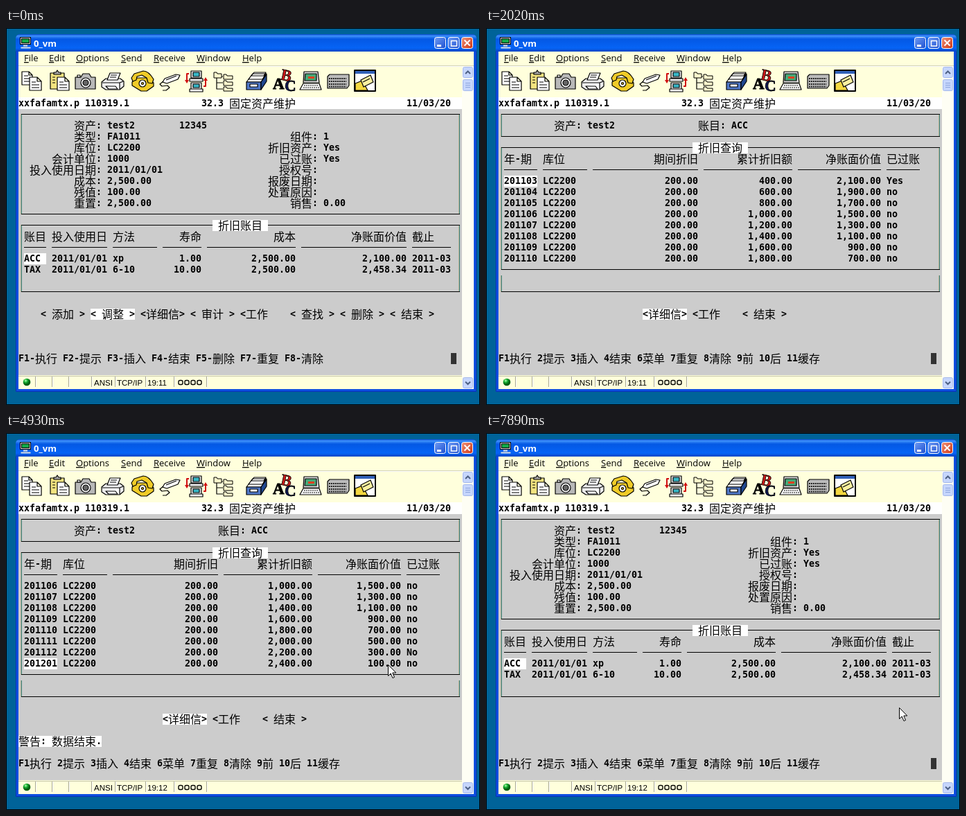
Recreate the animation shown at these times as an HTML page. Size 684 by 544 pixels, loop 8000 ms.

```html
<!DOCTYPE html>
<html lang="zh">
<head>
<meta charset="utf-8">
<title>Terminal</title>
<style>
html, body { margin: 0; width: 100%; height: 100%; overflow: hidden; background: #006399; }
svg { display: block; }
text { white-space: pre; }
.a { font: bold 13.29px "DejaVu Sans Mono", monospace; }
.c { font: 16px "Noto Sans CJK SC", "Noto Sans CJK", sans-serif; }
.menu { font: 13px "Open Sans", sans-serif; }
.bar { font: 11.5px "Liberation Sans", sans-serif; }
.abc { font: bold 23px "Liberation Serif", serif; stroke-width: .8; }
.icons { fill: #fff; stroke: #000; stroke-width: 1.2; stroke-linejoin: round; }
.n { fill: none; }
</style>
</head>
<body>
<svg width="684" height="544" viewBox="0 0 684 544">
<defs>
  <linearGradient id="cap" x2="0" y2="1">
    <stop offset="0" stop-color="#0a4ad0"/><stop offset=".1" stop-color="#3d90fa"/>
    <stop offset=".28" stop-color="#0458e4"/><stop offset=".8" stop-color="#0664f6"/>
    <stop offset="1" stop-color="#0344c4"/>
  </linearGradient>
  <linearGradient id="btn" x2="1" y2="1">
    <stop offset="0" stop-color="#6f9cf5"/><stop offset="1" stop-color="#1c4fd0"/>
  </linearGradient>
  <linearGradient id="red" x2="1" y2="1">
    <stop offset="0" stop-color="#f0937a"/><stop offset="1" stop-color="#cc3311"/>
  </linearGradient>
  <radialGradient id="led" cx=".35" cy=".3">
    <stop offset="0" stop-color="#b0ffb0"/><stop offset=".5" stop-color="#18b030"/><stop offset="1" stop-color="#006010"/>
  </radialGradient>
</defs>
<rect width="684" height="544" fill="#006399"/>
<path d="M.5 .5H683.5V543.5H.5Z" fill="none" stroke="#000"/>

<!-- window frame -->
<path d="M14 525V16q0-7 7-7H672q7 0 7 7V525Z" fill="#0f4fe0"/>
<path d="M14 34V16q0-7 7-7H672q7 0 7 7V34Z" fill="url(#cap)"/>
<path d="M14.5 34V524.5H678.5V34" fill="none" stroke="#0830b8"/>
<rect x="18" y="34" width="657" height="487" fill="#ffffdc"/>
<path d="M18 54.5H675" stroke="#d0d0b4"/>
<path d="M18 55.5H675" stroke="#fff"/>
<g stroke="#000">
  <rect x="20.5" y="13.5" width="15" height="10" fill="#d8d8d8"/>
  <rect x="22.5" y="15.5" width="11" height="6" fill="#12a848"/>
  <path d="M25 25.5h6M21.5 28.5h14" stroke="#ddd" stroke-width="2"/>
</g>
<text x="40" y="26.5" fill="#fff" style="font:bold 13px 'Open Sans',sans-serif">0_vm</text>
<g stroke="#fff">
  <rect x="618.5" y="13.5" width="16" height="16" rx="3" fill="url(#btn)"/>
  <rect x="638" y="13.5" width="16" height="16" rx="3" fill="url(#btn)"/>
  <rect x="657.5" y="13.5" width="16" height="16" rx="3" fill="url(#red)"/>
  <path d="M622 25.5h6" stroke-width="3"/>
  <path d="M642 18.5h8.5M642.5 18v8h8v-8" class="n" stroke-width="1.5"/>
  <path d="M661.5 17.5l8 8m0-8l-8 8" stroke-width="2"/>
</g>
<g id="menu" class="menu"></g>

<!-- toolbar -->
<g class="icons">
  <path d="M23 63h10l5 5v14H23ZM33 63v5h5M26 69h6M26 73h9M26 77h9"/>
  <path d="M34 71h11l6 6v13H34ZM45 71v6h6M37 78h6M37 82h11M37 86h11"/>

  <path d="M64 65h20v23H64Z" fill="#f2e480"/>
  <path d="M69 67v-3h3l2-3 2 3h3v3Z" fill="#aaa"/>
  <path d="M74 71h11l6 6v13H74ZM85 71v6h6M77 78h6M77 82h11M77 86h11M67 71h4M67 75h4M67 79h4"/>

  <path d="M100 71h8l3-5h9l3 5h6v17h-29Z" fill="#b8b8b8"/>
  <path d="M103 68h4v3h-4Z"/>
  <circle cx="115" cy="79" r="7"/><circle cx="115" cy="79" r="4" fill="#666"/>

  <path d="M138 78l6-5h21l5 4v7l-6 5h-20l-6-4Z" fill="#eee"/>
  <path d="M146 75l4-10h15l-4 10ZM151 68h9M150 71h9M139 79h25v9M164 79l5-2"/>
  <path d="M144 84h14l3 4h-13Z"/>

  <g fill="#f0cc28">
    <path d="M182 78l7-6h14l10 7v5l-10 7h-8l-13-8Z"/>
    <path d="M181 72l4-6 13-4q8 0 15 12l-2 6-6-1-2-7-7-4-7 2-1 5-5 2Z"/>
    <circle cx="197" cy="80" r="5" fill="#fff"/><circle cx="197" cy="80" r="1.5"/>
  </g>

  <path d="M229 73l16-6 6 1-3 6-16 6-6-2Z"/>
  <path d="M231 75l15-6M227 77l-5 4 3 3 8-1 3 3-5 4h-5" class="n"/>

  <g fill="#eee">
    <path d="M267 62h15v10h-15ZM265 73h19v4h-19ZM267 79h15v9h-15ZM265 88h19v4h-19Z"/>
    <path d="M270 64h9v6h-9ZM270 81h9v5h-9Z" fill="#38b8c8"/>
  </g>
  <path d="M264 66h-3v10M285 84h3v-9" stroke="#d01010" stroke-width="2" class="n"/>
  <path d="M258 75h6l-3 5ZM285 76h6l-3-5Z" fill="#d01010" stroke="none"/>

  <path d="M304 72v16h9M304 79h9M304 70h9" class="n"/>
  <path d="M300 64h4l1 2h6v6h-11ZM314 67h4l1 2h8v5h-13ZM314 76h4l1 2h8v5h-13ZM314 85h4l1 2h8v4h-13Z" fill="#fbf6cc" stroke-width="1"/>

  <path d="M347 78l9-12h20l-8 12Z"/>
  <path d="M350 74l6-8h19l-5 8ZM354 69l4-5h17l-3 5Z"/>
  <path d="M347 78h21v11h-21Z" fill="#5078c8"/><path d="M368 78l8-11v10l-8 12Z" fill="#204890"/>
  <path d="M352 81h11v4h-11Z"/>

  <text class="abc" x="385" y="88" fill="#000">A</text>
  <text class="abc" x="397" y="76" fill="#d01818" transform="rotate(12 404 68)">B</text>
  <text class="abc" x="402" y="91" fill="#101850">C</text>

  <path d="M430 63h20l2 16h-23Z" fill="#ddd"/><path d="M432 66h16v10h-17Z" fill="#48a878"/>
  <path d="M436 70h9v3h-9Z" fill="#e04020" stroke="none"/>
  <path d="M429 80h23l3 9h-31Z"/><path d="M430 83h21M429 86h23" stroke-dasharray="2 1"/>

  <path d="M464 70l3-3h28v16l-3 4h-28Z" fill="#bbb"/>
  <path d="M466 73h25M466 77h25M466 81h25M466 84.5h25" stroke="#222" stroke-width="2" stroke-dasharray="2 1"/>

  <path d="M503 61h30v30h-30Z" stroke-width="2"/>
  <path d="M504 62h28v4h-28Z" fill="#3060b8" stroke="none"/>
  <path d="M504 80l10-4 8 14h-18Z" fill="#f4d840"/>
  <path d="M512 75l14-7 4 10-14 7Z" fill="#fbf0a0"/><path d="M515 78l10-5" class="n"/>
</g>

<!-- scrollbar -->
<rect x="658" y="56" width="17" height="465" fill="#fefef4"/>
<g fill="#c6d6fc" stroke="#a4b8ea">
  <rect x="659.5" y="56.5" width="14" height="15" rx="2"/>
  <rect x="659.5" y="74.5" width="14" height="16" rx="2"/>
  <rect x="659.5" y="504.5" width="14" height="15" rx="2"/>
</g>
<path d="M663 66l3.5-3.5 3.5 3.5M663 510.5l3.5 3.5 3.5-3.5" fill="none" stroke="#4d6185" stroke-width="2"/>
<path d="M663 79.5h7M663 82.5h7M663 85.5h7" stroke="#8ca4dc"/>

<!-- terminal -->
<rect x="18" y="100" width="640" height="17" fill="#fff"/>
<rect x="18" y="117" width="640" height="384" fill="#ccc"/>
<g id="term"></g>

<!-- status bar -->
<path d="M18 502.5H658" stroke="#c8c8ac"/>
<g id="seps"></g>
<circle cx="30" cy="511" r="5.3" fill="url(#led)"/>
<g class="bar">
  <text x="127" y="515.5">ANSI</text><text x="160" y="515.5">TCP/IP</text>
  <text id="clock" x="204" y="515.5"></text>
</g>
<g id="dots" fill="none" stroke="#000" stroke-width="1.4"></g>

<path id="mouse" d="M.5 .5V16.5L4.2 13L7 19.5L9.5 18.4L6.8 12H11.8Z" fill="#fff" stroke="#000"/>
</svg>

<script>
const $ = id => document.getElementById(id);
const X = col => 18 + 8 * col, Y = row => 101 + 16 * row;
const width = s => [...s].reduce((n, ch) => n + (ch > '\u4e00' ? 2 : 1), 0);
const esc = s => s.replace(/&/g, '&amp;').replace(/</g, '&lt;');
const money = n => n.toLocaleString('en-US', { minimumFractionDigits: 2 });

// Lays text on the 8 x 16 cell grid; Chinese characters take two cells.
function put(col, row, str, ink = '#000') {
  let out = '';
  for (const run of str.match(/[\u4e00-\u9fff]+|\s+|[^\u4e00-\u9fff\s]+/g) || []) {
    const wide = run > '\u4e00';
    if (run.trim()) out += `<text class="${wide ? 'c' : 'a'}" x="${X(col)}" y="${Y(row) + (wide ? 13.5 : 12)}" fill="${ink}">${esc(run)}</text>`;
    col += width(run);
  }
  return out;
}
const right = (end, row, str) => put(end - width(str), row, str);
const fill = (col, row, n, color = '#fff') =>
  `<rect x="${X(col)}" y="${Y(row)}" width="${8 * n}" height="16" fill="${color}"/>`;
const lit = (col, row, str, on = true) => (on ? fill(col, row, width(str)) : '') + put(col, row, str);
const line = (x1, y1, x2, y2, color) => `<path d="M${x1} ${y1}L${x2} ${y2}" stroke="${color}"/>`;

// Rules run through the eighth pixel row of their cell.
const rule = (row, x1, x2) => line(x1, Y(row) + 7.5, x2, Y(row) + 7.5, '#000');
const rules = (row, spans) => spans.map(([a, b]) => rule(row, X(a), X(b))).join('');

function box(top, bottom, open) {
  const y1 = Y(top) + (open ? 0 : 7), y2 = Y(bottom) + 8;
  const side = x => line(x - .5, y1, x - .5, y2, '#b4b08c') + line(x + .5, y1, x + .5, y2, '#3a8080');
  return side(22) + side(654) + (open ? '' : rule(top, 22, 655)) + rule(bottom, 22, 655);
}
const buttons = (first, names, pick) => names.map((s, i) => lit(first + 9 * i, 19, s, i === pick)).join('');

const leftFields = [['资产', 'test2'], ['类型', 'FA1011'], ['库位', 'LC2200'], ['会计单位', '1000'],
  ['投入使用日期', '2011/01/01'], ['成本', '2,500.00'], ['残值', '100.00'], ['重置', '2,500.00']];
const rightFields = [['组件', '1'], ['折旧资产', 'Yes'], ['已过账', 'Yes'], ['授权号', ''],
  ['报废日期', ''], ['处置原因', ''], ['销售', '0.00']];
const fields = (list, end, row) => list.map(([k, v], i) =>
  right(end, row + i, k + ':') + put(end + 1, row + i, v)).join('');

function account(row, [book, method, life, net]) {
  return put(1, row, book) + put(6, row, '2011/01/01') + put(17, row, method) + right(33, row, life) +
    right(50, row, '2,500.00') + right(70, row, net) + put(71, row, '2011-03');
}

function assetView(s) {
  return box(1, 10) + fields(leftFields, 15, 2) + put(29, 2, '12345') + fields(rightFields, 54, 3) +
    box(11, 17) + lit(35, 11, ' 折旧账目 ') +
    put(1, 12, '账目 投入使用日 方法') + right(33, 12, '寿命') + right(50, 12, '成本') + right(70, 12, '净账面价值') + put(71, 12, '截止') +
    rules(13, [[1, 5], [6, 16], [17, 25], [26, 33], [34, 50], [51, 70], [71, 78]]) +
    fill(1, 14, 4) + account(14, ['ACC', 'xp', '1.00', '2,100.00']) +
    account(15, ['TAX', '6-10', '10.00', '2,458.34']) +
    (s.pick < 0 ? '' : buttons(4, ['< 添加 >', '< 调整 >', '<详细信>', '< 审计 >', '<工作', '< 查找 >', '< 删除 >', '< 结束 >'], s.pick));
}

function period(i, row, on) {
  const m = 2 + i;
  const name = 2011 + Math.floor(m / 12) + String(m % 12 + 1).padStart(2, '0');
  return lit(1, row, name, on) + put(8, row, 'LC2200') + right(36, row, '200.00') +
    right(53, row, money(400 + 200 * i)) + right(69, row, money(2100 - 200 * i)) +
    put(70, row, i === 0 ? 'Yes' : i === 9 ? 'No' : 'no');
}

function queryView(s) {
  let out = box(1, 3) + put(10, 2, '资产: test2') + put(36, 2, '账目: ACC') +
    box(4, 15) + box(16, 17, true) + lit(35, 4, ' 折旧查询 ') +
    put(1, 5, '年-期') + put(8, 5, '库位') + right(36, 5, '期间折旧') + right(53, 5, '累计折旧额') +
    right(69, 5, '净账面价值') + put(70, 5, '已过账') +
    rules(6, [[1, 7], [8, 16], [17, 36], [37, 53], [54, 69], [70, 76]]);
  for (let i = 0; i < 8; i++) out += period(s.top + i, 7 + i, i === s.row);
  if (s.sel) out += fill(s.sel, 14, 69 - s.sel, '#333') + put(s.sel, 14, ' 100.00'.slice(s.sel - 62), '#fff');
  if (s.warn) out += lit(0, 21, '警告: 数据结束.');
  return out + buttons(26, ['<详细信>', '<工作', '< 结束 >'], s.pick);
}

const assetKeys = 'F1-执行 F2-提示 F3-插入 F4-结束 F5-删除 F7-重复 F8-清除';
const queryKeys = 'F1执行 2提示 3插入 4结束 6菜单 7重复 8清除 9前 10后 11缓存';

// Each step changes part of the state at its time in ms.
const steps = [
  [0, { view: assetView, pick: 1, foot: assetKeys, caret: 1, clock: '19:11', mouse: null, sel: 0, warn: 0, top: 0, row: 0 }],
  [100, { caret: 0 }],
  [410, { caret: 1 }],
  [950, { pick: 2 }],
  [1380, { pick: 3 }],
  [1590, { pick: -1, foot: 'Compiling /new/xxfarcblxp.p' }],
  [2020, { view: queryView, pick: 0, foot: queryKeys }],
  [2110, { row: 1 }],
  [2670, { clock: '19:12' }],
  [3100, { row: 3 }],
  [3205, { row: 6 }],
  [3310, { row: 7, top: 1 }],
  [3450, { top: 2 }],
  [3510, { top: 3, warn: 1, mouse: [682, 399] }],
  [4290, { mouse: [672, 397] }],
  [4395, { mouse: [648, 390] }],
  [4500, { mouse: [620, 378] }],
  [4600, { mouse: [594, 362], caret: 0 }],
  [4705, { mouse: [572, 348] }],
  [4810, { mouse: [556, 338] }],
  [4915, { mouse: [551, 334] }],
  [5020, { mouse: [555, 334] }],
  [5120, { mouse: [558, 333], caret: 1 }],
  [5225, { mouse: [560, 332] }],
  [5330, { mouse: [560, 331] }],
  [5540, { mouse: [548, 331], sel: 66 }],
  [5640, { mouse: [530, 331], sel: 64 }],
  [5740, { mouse: [516, 331], sel: 62 }],
  [5970, { mouse: [554, 358] }],
  [6070, { mouse: [574, 376], sel: 0 }],
  [6170, { mouse: [587, 386], caret: 0 }],
  [6270, { mouse: [591, 388] }],
  [6480, { mouse: [595, 394], caret: 1 }],
  [6580, { mouse: [596, 396] }],
  [7030, { pick: 1 }],
  [7230, { pick: 2 }],
  [7330, { caret: 0 }],
  [7890, { view: assetView, pick: -1, warn: 0, caret: 1 }]
];

const head = put(0, 0, 'xxfafamtx.p 110319.1') + put(33, 0, '32.3 固定资产维护') + put(70, 0, '11/03/20');

function draw(s) {
  $('term').innerHTML = head + s.view(s) + put(0, 23, s.foot) + (s.caret ? fill(78, 23, 1, '#333') : '');
  $('clock').textContent = s.clock;
  $('mouse').style.display = s.mouse ? '' : 'none';
  if (s.mouse) $('mouse').setAttribute('transform', `translate(${s.mouse})`);
}

$('menu').innerHTML = [[26, 'File'], [62, 'Edit'], [101, 'Options'], [166, 'Send'], [213, 'Receive'], [275, 'Window'], [341, 'Help']]
  .map(([x, s]) => `<text x="${x}" y="48"><tspan text-decoration="underline">${s[0]}</tspan>${s.slice(1)}</text>`).join('');
$('seps').innerHTML = [42, 66, 90, 123, 157, 201, 242, 289].map(x =>
  line(x + .5, 503, x + .5, 518, '#a8a890') + line(x + 1.5, 503, x + 1.5, 518, '#fff')).join('');
$('dots').innerHTML = [0, 1, 2, 3].map(i => `<rect x="${249 + 9 * i}" y="508.5" width="6" height="6" rx="2"/>`).join('');

let shown = -1;
function tick() {
  const t = performance.now() % 8000;
  const n = steps.filter(([at]) => at <= t).length;
  if (n !== shown) {
    shown = n;
    draw(Object.assign({}, ...steps.slice(0, n).map(([, patch]) => patch)));
  }
  requestAnimationFrame(tick);
}
tick();
</script>
</body>
</html>
```
